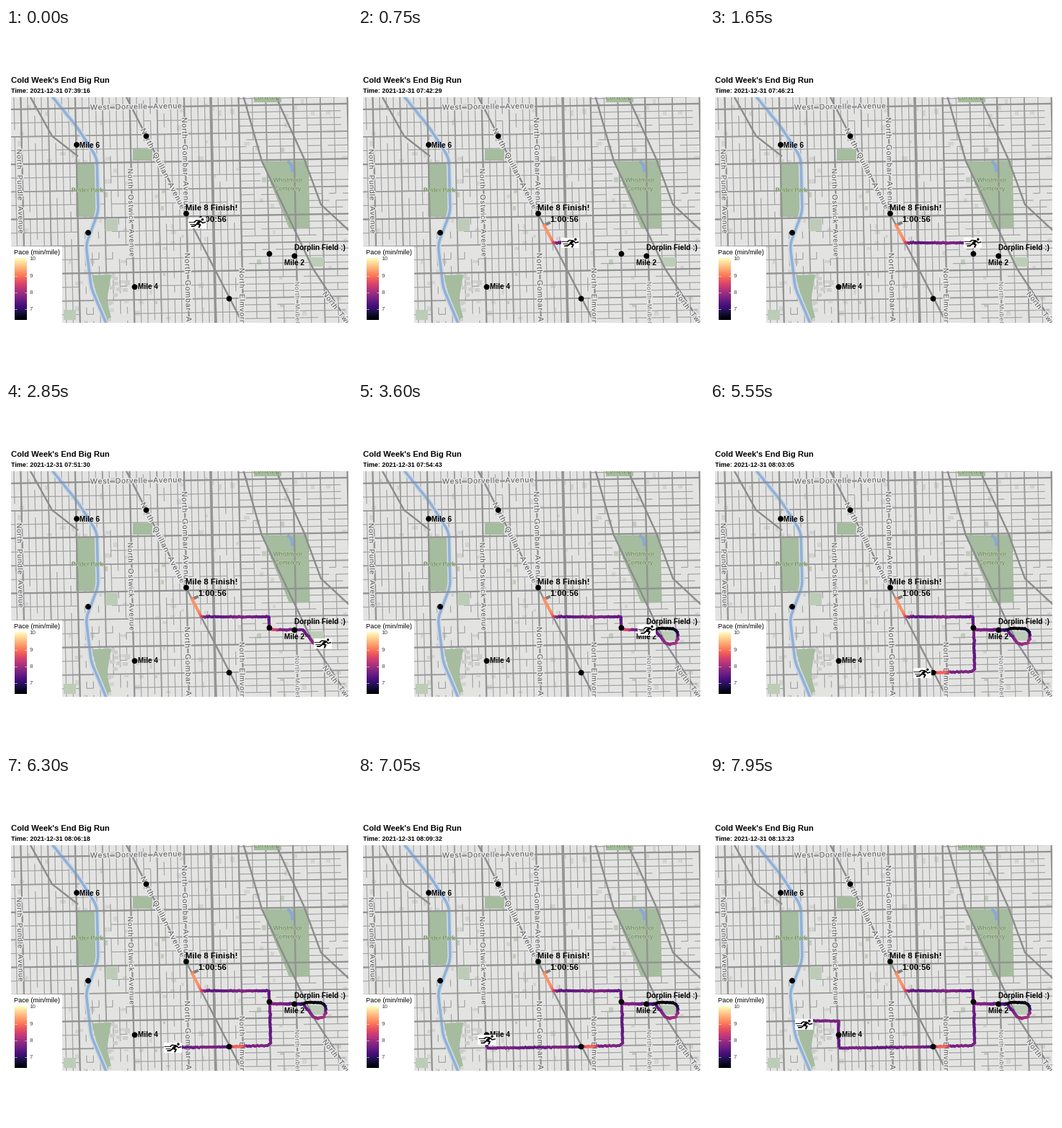
A matplotlib script that plays this animation: 480 by 480 pixels, repeating every 8000 ms.

```python
import numpy as np
import matplotlib.pyplot as plt
from matplotlib.animation import FuncAnimation
from matplotlib.collections import LineCollection
from matplotlib.patches import Circle, Polygon, Rectangle
from matplotlib.patheffects import withStroke

PX = 0.72  # points per pixel at 100 dpi
W, H = 480, 480
LEFT, RIGHT, TOP, BOTTOM = 7, 475, 96, 409
HOLD = 3  # ticks of 50 ms per step
rng = np.random.default_rng(8)
plt.rcParams["font.family"] = ["Liberation Sans", "DejaVu Sans"]

fig = plt.figure(figsize=(4.8, 4.8), dpi=100, facecolor="white")
land = fig.add_axes([LEFT / W, 1 - BOTTOM / H, (RIGHT - LEFT) / W, (BOTTOM - TOP) / H])
land.set(xlim=(LEFT, RIGHT), ylim=(BOTTOM, TOP), xticks=[], yticks=[], facecolor="#e3e3e2")
land.spines[:].set_visible(False)
page = fig.add_axes([0, 0, 1, 1])
page.set(xlim=(0, W), ylim=(H, 0))
page.axis("off")


def write(ax, x, y, s, size, color="black", **kw):
    kw = {"va": "center", "ha": "left", "clip_on": True, **kw}
    return ax.text(x, y, s, fontsize=size * PX, color=color, **kw)


# ---- street map: a slightly tilted grid of half-mile cells ----------------
CELL_U, CELL_V = 75.5, 76.3


def grid(col, row):
    u, v = 24 + col * CELL_U, 110 + row * CELL_V
    return u + 0.022 * (v - 258), v - 0.017 * (u - 180)


def north_south(col):
    return [grid(col, -0.5), grid(col, 4.2)]


def east_west(row):
    return [grid(-0.5, row), grid(6.5, row)]


def streets(lines, color, width, z):
    land.add_collection(LineCollection(lines, colors=color, linewidths=width * PX,
                                       capstyle="butt", zorder=z))


def area(points, color, z=3):
    land.add_patch(Polygon(points, fc=color, ec="none", zorder=z))


def box(x, y, w, h, color, z=3):
    land.add_patch(Rectangle((x, y), w, h, fc=color, ec="none", zorder=z))


minor = []
for col in range(-1, 6):
    across, down = (4, 8) if col >= 4 else (8, 4)
    for row in range(-1, 4):
        keep = 0.5 if col == 1 and row >= 2 else 0.92
        for i in range(8):
            for j in range(8):
                c, r = col + i / 8, row + j / 8
                if i % (8 // across) == 0 and rng.random() < keep:
                    minor.append([grid(c, r), grid(c, r + 1 / 8)])
                if j % (8 // down) == 0 and rng.random() < keep:
                    minor.append([grid(c, r), grid(c + 1 / 8, r)])
streets(minor, "#eeeeee", 3, 1)
streets(minor, "#a8a8a8", 1.5, 2)
halves = np.arange(0.5, 6)
streets([north_south(c) for c in halves] + [east_west(r) for r in halves[:4]],
        "#9c9c9c", 1.9, 2.2)

# Scattered buildings and small lawns
for k in range(110):
    x, y = rng.uniform((LEFT, TOP), (RIGHT, BOTTOM))
    w, h = rng.uniform(3, 8, 2)
    box(x, y, w, h, "#bfcdb8" if k % 9 == 0 else "#d3d3d1", 1.5)
for k in range(14):
    box(rng.uniform(132, 166), rng.uniform(340, 382), 7, 5, "#cdcdcb")

GREEN, PALE = "#a5bc9f", "#bdccb7"
box(97, 188, 31, 74, GREEN)
box(176, 168, 27, 16, GREEN)
box(344, 96, 38, 7, GREEN)
box(138, 265, 17, 17, PALE)
box(420, 318, 21, 13, PALE)
box(80, 391, 17, 14, PALE)
area([(119, 343), (146, 342), (140, 378), (146, 402), (134, 405)], GREEN)
area([(355, 185), (419, 184), (421, 277), (393, 279)], GREEN)
land.plot([392, 396, 397], [186, 190, 198], color="#86aad6", lw=4 * PX, zorder=3.2)

river_y = np.arange(86, 416)
river_x = np.interp(river_y, [90, 138, 180, 255, 300, 360, 412],
                    [60, 99, 126, 128, 111, 118, 140])
river_x = np.convolve(np.pad(river_x, 8, mode="edge"), np.full(17, 1 / 17), "valid")
land.plot(river_x, river_y, color="#d2dae2", lw=7 * PX, zorder=3.4)
land.plot(river_x, river_y, color="#8fb0d9", lw=3.6 * PX, zorder=3.5)

streets([north_south(c) for c in range(7)] + [east_west(r) for r in range(4)],
        "#929292", 2.3, 4)
streets([north_south(3.49)], "#959595", 3.6, 4)
streets([[(164, 90), (250, 258), (330, 413)],
         [(328, 90), (355, 185), (426, 334), (480, 416)],
         [(372, 90), (413, 180), (437, 245), (478, 283)],
         [(34, 96), (64, 150), (100, 178)]], "#8c8c8c", 2.4, 4)

halo = [withStroke(linewidth=3 * PX, foreground="#e8e8e8")]
park_halo = [withStroke(linewidth=1 * PX, foreground="#c6d5be")]


def street_name(x, y, name, angle, size=10, color="#555555"):
    spaced = "\u200a".join(name.replace(" ", "  "))
    write(land, x, y, spaced, size, color, rotation=angle, rotation_mode="anchor",
          zorder=5, path_effects=halo)


street_name(117, 110.5, "West Dorvelle Avenue", 1, 10.4)
street_name(189, 140, "North Quillan Avenue", -63, 10.5)
street_name(247, 124, "North Gombar Avenue", -88.7, 10.5)
street_name(251, 312, "North Gombar Avenue", -88.7, 10.5)
street_name(172, 195, "North Ostwick Avenue", -88.7)
street_name(18, 168, "North Pundle Avenue", -88.7)
street_name(327, 333, "North Elmvorn Avenue", -89.5)
street_name(403.5, 352, "North Mubet Avenue", -89, 8.6, "#707070")
street_name(441, 367, "North Twiss Street", -52)

for x, y, name in [(113, 226, "Pelder Park"), (391, 212, "Whistmoor"),
                   (391, 224, "Cemetery"), (362, 98, "Cemetery")]:
    write(land, x, y, name, 8.4, "#58793f", ha="center", zorder=5, path_effects=park_halo)

# ---- headings and legend --------------------------------------------------
write(page, 7, 76, "Cold Week's End Big Run", 11.3, weight="bold", va="baseline")
clock = write(page, 7, 89.5, "", 8.9, weight="bold", va="baseline")

PACE_MIN, PACE_MAX = 6.35, 10.03
page.add_patch(Rectangle((7, 302.5), 71, 108, fc="white", zorder=1))
write(page, 11, 313.5, "Pace (min/mile)", 9.1, va="baseline", zorder=2)
page.imshow(np.linspace(1, 0, 256)[:, None], cmap="magma", extent=(12, 28.5, 405, 319.5),
            aspect="auto", zorder=2)
page.set(xlim=(0, W), ylim=(H, 0))
for pace in range(7, 11):
    y = 320.3 + (10 - pace) * 23.3
    for x in (12, 25.5):
        page.plot([x, x + 3], [y, y], color="white", lw=0.4, zorder=3)
    write(page, 32.5, y + 0.4, str(pace), 8, "#444444", zorder=3)

# ---- route ----------------------------------------------------------------
corners = np.array([
    (265, 270.5), (258, 273.5), (271, 298), (364.5, 298), (365.5, 315), (371, 316),
    (412, 316), (426, 334), (432, 336.5), (440, 334.5), (443.5, 329), (443.5, 319),
    (438, 314.5), (417, 314), (411, 316.5), (366, 316), (367, 371), (363, 374),
    (292, 376), (181, 377.5), (178.5, 374), (178.5, 340), (143, 339.5), (128, 345.5)])
arc = np.r_[0, np.cumsum(np.hypot(*np.diff(corners, axis=0).T))]


def place(distance):
    return np.column_stack([np.interp(distance, arc, axis) for axis in corners.T])


def travelled(step):
    return 11.7 * step + 0.85 * max(step - 11, 0)


def pace_at(distance):
    """A steady pace with slow and fast stretches: centre, half width, change."""
    pace = 7.55 + 0.15 * np.sin(distance / 12)
    for centre, half, change in [(18, 20, 1.5), (150, 9, 0.9), (222, 17, 0.4),
                                 (263, 21, -1.1), (428, 10, 1.4)]:
        pace += change * np.exp(-((distance - centre) / half) ** 6)
    return pace


dist = np.arange(0, arc[-1] + 1.5, 1.5)
track = place(dist) + rng.normal(0, 0.25, (dist.size, 2)) * (dist > 36)[:, None]
pieces = np.stack([track[:-1], track[1:]], axis=1)
colors = plt.cm.magma((pace_at(dist[:-1]) - PACE_MIN) / (PACE_MAX - PACE_MIN))
colors[dist[:-1] < 6] = (0.5, 0.5, 0.5, 1)
widths = np.where(np.arange(len(pieces)) % 3, 2.9, 4) * PX
trail = LineCollection([], zorder=4, capstyle="projecting")
page.add_collection(trail)

# ---- mile markers: the first four lie on the drawn route ------------------
miles = np.vstack([place(147.7 * np.arange(1, 5) - 3.5),
                   [(114, 284), (98, 162), (194.5, 150), (250, 257.5)]])
for spot in miles:
    page.add_patch(Circle(spot, 3.9, fc="black", ec="none", zorder=6))
for x, y, s, size in [(102.3, 162.5, "Mile 6", 10), (249, 250, "Mile 8 Finish!", 11.4),
                      (266.5, 266, "1:00:56", 11.4), (400.5, 305, "Dorplin Field :)", 10),
                      (386.5, 325.8, "Mile 2", 10), (182.8, 359.3, "Mile 4", 10)]:
    write(page, x, y, s, size, weight="bold", zorder=7)

# ---- runner ---------------------------------------------------------------
limbs = [np.array(p, float) for p in (
    [(5, -3), (0, 1.2)], [(5, -3), (7.5, 0), (12, -1.2)],
    [(4, -3), (-1, -3.6), (-4, -1.2)], [(0, 1.2), (4.5, 2.4), (2.5, 6.5)],
    [(0, 1.2), (-3.5, 4.2), (-8, 4.4)], [(-12, -1.8), (-3, -1.8)], [(-10, 1), (-3, 1)])]
limb_widths = np.array([3.2, 1.5, 1.5, 2, 1.8, 0.9, 0.9]) * PX
card = Rectangle((0, 0), 25, 14.5, fc="white", ec="none", zorder=8)
body = LineCollection([], colors="black", linewidths=limb_widths, zorder=9)
head = Circle((0, 0), 1.7, fc="black", ec="none", zorder=9)
page.add_patch(card)
page.add_collection(body)
page.add_patch(head)


def update(tick):
    step = tick // HOLD
    gone = travelled(step)
    x, y = place(gone)[0]
    n = int(np.searchsorted(dist, gone))
    trail.set_segments(pieces[:n])
    trail.set_color(colors[:n])
    trail.set_linewidth(widths[:n] if n else [1])
    card.set_xy((x - 12.5, y - 7.2))
    body.set_segments([limb + (x, y) for limb in limbs])
    head.center = (x + 7.6, y - 4.8)
    seconds = (7 * 60 + 39) * 60 + 16 + int(38.64 * step)
    clock.set_text(f"Time: 2021-12-31 {seconds // 3600:02d}:"
                   f"{seconds // 60 % 60:02d}:{seconds % 60:02d}")
    return trail, card, body, head, clock


anim = FuncAnimation(fig, update, frames=160, interval=50, repeat=True, repeat_delay=0)
plt.show()
```
